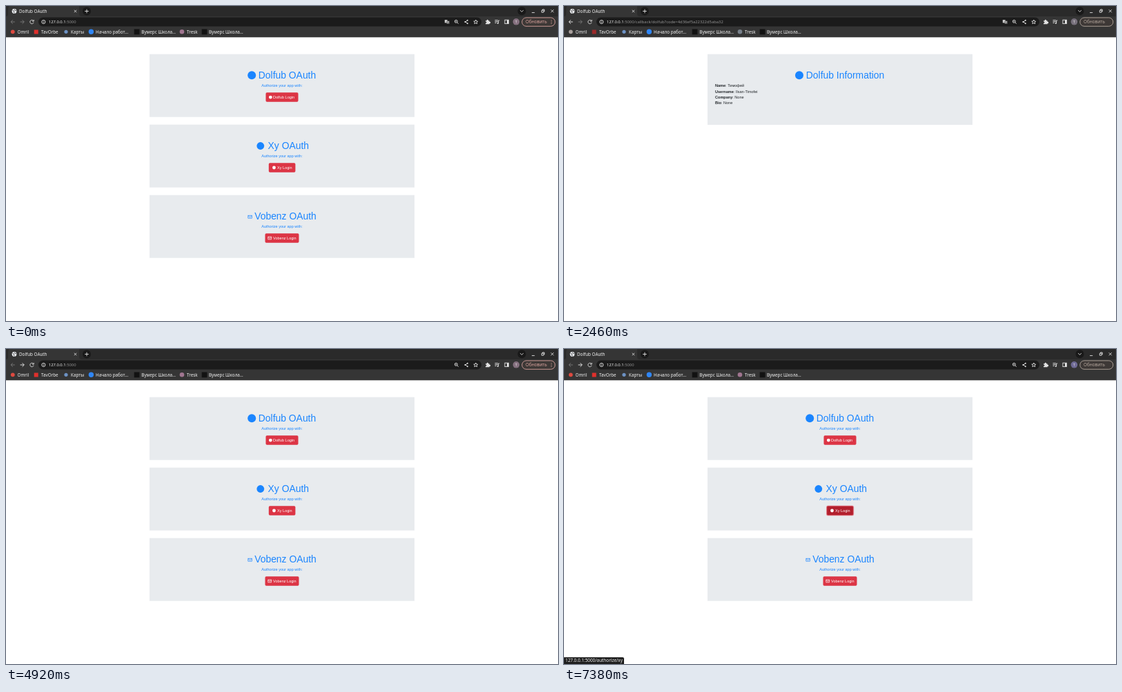
An HTML page that plays this animation: 800 px wide and 456 px high, repeating every 8 s.

```html
<!DOCTYPE html>
<html lang="ru">
<head>
<meta charset="utf-8">
<title>OAuth demo</title>
<style>
  html, body { margin: 0; width: 100%; height: 100%; overflow: hidden; background: #fff; }
  svg { display: block; width: 800px; height: 456px; }
  text { white-space: pre; }
  .ui { font: 6.3px "Noto Sans", "Open Sans", sans-serif; fill: #f1f1f1; }
  .page { font: 5.56px "Liberation Sans", Arial, sans-serif; fill: #212529; }
  .page .title { font-size: 13.9px; }
  .blue { fill: #1a85ff; }
  .bold { font-weight: bold; }
  .line { fill: none; stroke: #e4e4e4; stroke-width: .9; }
</style>
</head>
<body>
<svg viewBox="0 0 800 456">
  <g class="page" id="page"></g>

  <g class="ui">
    <rect width="800" height="45.3" fill="#353535"/>
    <path d="M106 0H800V15H110Q106 15 106 11Z" fill="#2a2a2a"/>
    <path d="M0 0H5Q3 1 3 4V11Q3 15 0 15Z" fill="#2a2a2a"/>
    <circle cx="12" cy="7.5" r="3.4" fill="#e8eaed"/>
    <path d="M9.5 6l2 1.2v2l1 1.4M12.2 4.6l.6 1.6 2 .6" fill="none" stroke="#444" stroke-width=".9"/>
    <text x="19" y="9.8">Dolfub OAuth</text>
    <path class="line" d="M98.8 5.8l3.4 3.4M102.2 5.8l-3.4 3.4"/>
    <circle cx="117" cy="7.5" r="6" fill="#191919"/>
    <path class="line" d="M114.2 7.5h5.6M117 4.7v5.6"/>
    <circle cx="747.5" cy="7.2" r="6" fill="#191919"/>
    <path class="line" d="M745.2 6.2l2.3 2.2 2.3-2.2"/>
    <path class="line" d="M762 9.6h4.2M776.3 6.2h2.8v3h-2.8zM777.5 6v-1h2.7v3h-1M789.7 5.3l4 4M793.7 5.3l-4 4"/>

    <circle id="backHover" cx="9.8" cy="23" r="5.8" fill="#555"/>
    <path class="line" id="back" d="M12.8 23H7.2M9.8 20.3L7.1 23l2.7 2.7"/>
    <path class="line" id="forward" d="M20.6 23h5.6M23.6 20.3l2.7 2.7-2.7 2.7"/>
    <path class="line" d="M39.8 21.6a2.7 2.7 0 1 0 .3 2.2M40.2 19.9v2.2h-2.2"/>

    <rect x="47" y="16.6" width="642" height="12.8" rx="6.4" fill="#1b1b1b"/>
    <g class="line">
      <circle cx="54.4" cy="23" r="2.6"/>
      <path d="M54.4 22.6v1.9M54.4 21.3v.7"/>
      <circle cx="652.3" cy="22.3" r="2"/>
      <path d="M653.8 23.8l1.9 1.9M651.4 22.3h1.8"/>
      <path d="M668.6 20.9l-3 2.1 3 2.1"/>
      <path d="M680.8 20l.9 2 2.1.2-1.6 1.4.5 2.1-1.9-1.1-1.9 1.1.5-2.1-1.6-1.4 2.1-.2z"/>
      <path d="M708.5 20.6h4.4M708.5 22.5h4.4M708.5 24.4h2.4M713.6 25v-4h1.6"/>
      <rect x="722.9" y="20.2" width="5.4" height="5.4"/>
    </g>
    <g fill="#e4e4e4">
      <circle cx="668.8" cy="20.8" r="1"/><circle cx="665.4" cy="23" r="1"/><circle cx="668.8" cy="25.2" r="1"/>
      <circle cx="712.8" cy="25" r="1"/>
      <path d="M726 20.2h2.4v5.4H726z"/>
      <path d="M695 21.3h1.8a1.1 1.1 0 1 1 2.1 0h1.7v1.7a1.1 1.1 0 1 1 0 2v1.3H695v-1.7a1 1 0 1 0 0-1.8z"/>
    </g>
    <g id="translate">
      <rect x="635.8" y="20" width="3.8" height="4.4" fill="#c9c9c9"/>
      <rect x="638.6" y="21.6" width="4" height="4.2" fill="#777"/>
      <path d="M639.5 22.8h2.3M640.6 22v.8M639.6 25l1.9-2" stroke="#eee" stroke-width=".5"/>
    </g>
    <text x="61.8" y="25.2" font-size="5.85"><tspan>127.0.0.1</tspan><tspan id="path" fill="#929292"></tspan></text>

    <circle id="avatar" cx="739.4" cy="22.8" r="4.8"/>
    <text x="739.4" y="24.6" font-size="4.8" text-anchor="middle">Т</text>
    <g id="update" fill="currentColor">
      <rect x="747.8" y="16.9" width="48" height="12.4" rx="6.2" fill="#3d3836" stroke="currentColor" stroke-width=".9"/>
      <text x="753" y="25.2">Обновить</text>
      <g id="dots">
        <circle cx="790.3" cy="20.8" r=".6"/><circle cx="790.3" cy="23" r=".6"/><circle cx="790.3" cy="25.2" r=".6"/>
      </g>
    </g>
    <g id="bookmarks"></g>
  </g>

  <g class="ui" id="status">
    <path id="statusBox" fill="#1d1d1d"/>
    <text id="statusText" x="2" y="453.3" font-size="6.36"></text>
  </g>
</svg>

<script>
const $ = id => document.getElementById(id);
const LOOP = 8000, STEP = 1230;
const RED = '#dc3545', HOVER = '#c82333', ACTIVE = '#b21f2d';
const PINK = '#d8a29c', BEIGE = '#b5a79d';
const CODE_PATH = ':5000/callback/dolfub?code=4d36ef5a22322d5aba32';

const states = [
  { translate: 1, pill: PINK },
  { translate: 1, hover: 0, pill: BEIGE, link: 'dolfub' },
  { translate: 1, info: 1, pill: BEIGE },
  { translate: 1, info: 1, pill: BEIGE, backHover: 1 },
  { forward: 1, pill: PINK },
  { forward: 1, hover: 1, pill: PINK, link: 'xy' },
  { forward: 1, hover: 1, pressed: 1, pill: BEIGE, link: 'xy' }
];

const text = (x, y, s, cls = '', extra = '') => `<text x="${x}" y="${y}" class="${cls}" ${extra}>${s}</text>`;
const rect = (x, y, w, h, fill, extra = '') => `<rect x="${x}" y="${y}" width="${w}" height="${h}" fill="${fill}" ${extra}/>`;
const dot = (x, y, r, fill) => `<circle cx="${x}" cy="${y}" r="${r}" fill="${fill}"/>`;
const envelope = (x, y, w, h, color) =>
  `<path d="M${x} ${y}h${w}v${h}h${-w}zl${w / 2} ${h * .65} ${w / 2} ${-h * .65}" fill="none" stroke="${color}" stroke-width=".7"/>`;

// name, title x, button x, button width, label x, title icon, button icon (relative to card top)
const cards = [
  ['Dolfub', 365.8, 376.5, 47, 387, y => dot(356.2, y + 30.5, 6, '#1a85ff'), y => dot(383.3, y + 62.4, 2.4, '#fff')],
  ['Xy', 379.6, 380.8, 38.6, 393, y => dot(368.8, y + 30.8, 5.4, '#1a85ff'), y => dot(388.5, y + 62.3, 2.4, '#fff')],
  ['Vobenz', 360.2, 375.5, 49, 387, y => envelope(350.8, y + 29.6, 5.6, 3.9, '#1a85ff'), y => envelope(379.8, y + 60.4, 4.8, 3.7, '#fff')]
];

function card([name, titleX, buttonX, width, labelX, icon, smallIcon], i, state) {
  const y = 69.7 + i * 102;
  const hot = state.hover === i, pressed = hot && state.pressed;
  const fill = pressed ? ACTIVE : hot ? HOVER : RED;
  const ring = pressed ? 'stroke="#e15361" stroke-opacity=".5" stroke-width="1.6"' : '';
  return rect(208, y, 384, 91, '#e8ebee') + icon(y)
    + text(titleX, y + 35.4, name + ' OAuth', 'title blue')
    + text(370.2, y + 47.7, 'Authorize your app with:', 'blue')
    + rect(buttonX, y + 55.5, width, 13.6, fill, 'rx="1.7" ' + ring) + smallIcon(y)
    + text(labelX, y + 64.2, name + ' Login', '', 'fill="#fff"');
}

function infoCard() {
  const rows = [['Name', 'Тимофей'], ['Username', 'Ilsan-Timofei'], ['Company', 'None'], ['Bio', 'None']];
  return rect(208, 69.7, 384, 102.4, '#e8ebee') + dot(341, 100.2, 6, '#1a85ff')
    + text(350.8, 105.1, 'Dolfub Information', 'title blue')
    + rows.map(([key, value], i) =>
        text(219, 117.4 + i * 8.33, `<tspan class="bold">${key}</tspan>: ${value}`)).join('');
}

function bookmarks(muted) {
  const labels = [[16.5, 'Omril'], [51, 'TavOrbe'], [94, 'Карты'], [130, 'Начало работ…'],
    [196.3, 'Вумерс Школа…'], [262, 'Tresk'], [294, 'Вумерс Школа…']];
  return dot(9.8, 37.3, 2.9, muted ? '#a9a09d' : '#dd4a40')
    + rect(40.7, 34.5, 6, 6, muted ? '#9c2a2a' : '#e0302c')
    + dot(87, 37.3, 2.6, '#6d92c4') + dot(123.4, 37.3, 3.7, '#2f86f6')
    + dot(255, 37.3, 3.3, muted ? '#77808a' : '#a07590')
    + [185.7, 283.7].map(x => rect(x, 33.5, 7.8, 7.8, '#121212')).join('')
    + labels.map(([x, s]) => text(x, 39.5, s)).join('');
}

const show = (id, on) => $(id).setAttribute('visibility', on ? 'visible' : 'hidden');
const arrow = (id, on) => $(id).style.stroke = on ? '#f0f0f0' : '#7c7c7c';

function render(state) {
  $('page').innerHTML = state.info ? infoCard() : cards.map((c, i) => card(c, i, state)).join('');
  $('bookmarks').innerHTML = bookmarks(state.info);
  $('path').textContent = state.info ? CODE_PATH : ':5000';
  arrow('back', state.info);
  arrow('forward', state.forward);
  show('backHover', state.backHover);
  show('translate', state.translate);
  $('update').style.color = state.pill;
  show('dots', state.pill === PINK);
  $('avatar').style.fill = state.pill === PINK ? '#85707f' : state.link ? '#6f6b96' : '#77707c';
  show('status', state.link);
  if (state.link) {
    $('statusText').textContent = '127.0.0.1:5000/authorize/' + state.link;
    $('statusBox').setAttribute('d', `M0 446.3H${state.link === 'xy' ? 85 : 98}q2 0 2 2V456H0Z`);
  }
}

let current = -1;
function tick() {
  const index = Math.floor(performance.now() % LOOP / STEP);
  if (index !== current) render(states[current = index]);
  requestAnimationFrame(tick);
}
tick();
</script>
</body>
</html>
```
